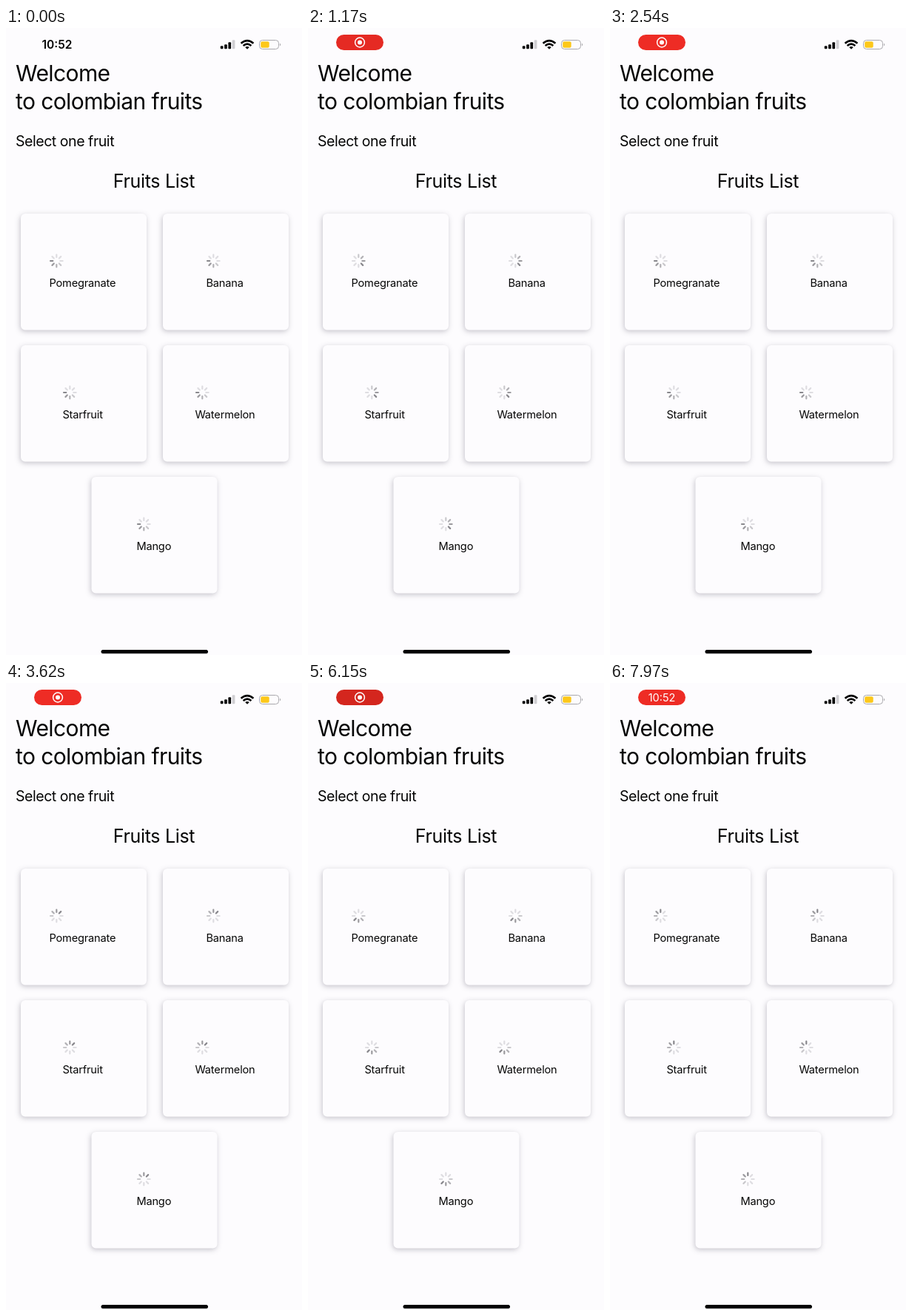
These frames come from a looping animation (400 px wide and 848 px high, 8000 ms). An HTML page:

```html
<!DOCTYPE html>
<html lang="en">
<head>
<meta charset="utf-8">
<title>Fruits</title>
<style>
  html, body { margin: 0; width: 100%; height: 100%; overflow: hidden; background: #fdfcfe; }
  svg { position: absolute; inset: 0; width: 100%; height: 100%; }
  text { font-family: Inter, "Open Sans", sans-serif; fill: #050505; }
  .title { font-size: 30px; letter-spacing: -.02em; }
  .hint { font-size: 19.5px; letter-spacing: -.023em; }
  .heading { font-size: 25px; letter-spacing: -.013em; text-anchor: middle; }
  .label { font-size: 14.6px; letter-spacing: -.012em; }
  .clock { font-size: 15.5px; font-weight: 600; text-anchor: middle; }
  .pill-clock { font-size: 14.5px; text-anchor: middle; fill: #fff; }
  .card { fill: #fdfcfe; filter: drop-shadow(-.5px 2.5px 3.8px rgba(30, 26, 50, .25)); }
  .spoke { stroke-width: 2.2; stroke-linecap: round; }
</style>
</head>
<body>
<svg id="stage" viewBox="0 0 400 848">
  <text id="clock" class="clock" x="69" y="28">10:52</text>

  <g id="pill">
    <rect id="pillShape" x="-32" y="-10.5" width="64" height="21" rx="10.5"/>
    <g id="record">
      <circle r="6.4" fill="none" stroke="#fff" stroke-width="1.5"/>
      <circle r="3" fill="#fff"/>
    </g>
    <text id="pillClock" class="pill-clock" y="5.3">10:52</text>
  </g>

  <g id="signal"></g>
  <g fill="none" stroke="#050505" stroke-width="2.6">
    <path d="M317.6 20.8Q326 13.6 334.4 20.8"/>
    <path d="M320.6 24Q326 19.4 331.4 24"/>
    <path d="M326 28.8L323.2 26Q326 23.8 328.8 26Z" fill="#050505" stroke="none"/>
  </g>
  <rect x="342.5" y="16.5" width="26" height="12" rx="4" fill="none" stroke="#a9a8ac"/>
  <rect x="344.2" y="18.2" width="11.5" height="8.6" rx="2" fill="#fdc81a"/>
  <path d="M370 20.5Q372.4 22.5 370 24.6Z" fill="#a9a8ac"/>

  <text class="title" x="13" y="72">Welcome</text>
  <text class="title" x="13" y="110">to colombian fruits</text>
  <text class="hint" x="13" y="160">Select one fruit</text>
  <text class="heading" x="200" y="215.5">Fruits List</text>
  <g id="cards"></g>
  <rect x="128.5" y="841" width="144.5" height="5" rx="2.5"/>
</svg>
<script>
const LOOP = 8000;
const $ = id => document.getElementById(id);

function add(parent, tag, attrs, text) {
  const node = document.createElementNS("http://www.w3.org/2000/svg", tag);
  for (const name in attrs) node.setAttribute(name, attrs[name]);
  if (text) node.textContent = text;
  parent.append(node);
  return node;
}

// Linear value at time t in a list of [time, value] steps.
function tween(steps, t) {
  const next = steps.findIndex(([time]) => time > t);
  if (next === 0) return steps[0][1];
  if (next < 0) return steps[steps.length - 1][1];
  const [t0, a] = steps[next - 1], [t1, b] = steps[next];
  return a + (b - a) * (t - t0) / (t1 - t0);
}

const mix = (from, to, k) =>
  `rgb(${from.map((c, i) => Math.round(c + (to[i] - c) * k)).join()})`;

[4, 6, 9, 12].forEach((height, i) => add($("signal"), "rect", {
  x: 289.8 + i * 5.3, y: 28.3 - height, width: 3.7, height, rx: 1,
  fill: i < 3 ? "#050505" : "#cfced2"
}));

// Card corner, label start and name.
const fruits = [
  [20, 251, 59, "Pomegranate"], [212, 251, 271, "Banana"],
  [20, 429, 77, "Starfruit"], [212, 429, 256, "Watermelon"],
  [115.5, 607, 177, "Mango"]
];
const spinners = fruits.map(([x, y, left, name]) => {
  add($("cards"), "rect", { class: "card", x, y, width: 170, height: 157.5, rx: 6 });
  add($("cards"), "text", { class: "label", x: left - .6, y: y + 99 }, name);
  const spinner = add($("cards"), "g", { transform: `translate(${left + 9.3} ${y + 64})` });
  return Array.from({ length: 8 }, (_, i) => add(spinner, "path", {
    class: "spoke", d: "M0 -5V-8.3", transform: `rotate(${i * 45})`
  }));
});

const spin = [[0, 6], [590, 16], [1690, 23], [2540, 30], [4780, 54], [6150, 69], [7970, 88], [8000, 88.3]];
const clockFade = [[60, 1], [400, 0]];
const pillFade = [[330, 0], [590, .58], [770, 1]];
const pillScale = [[330, .6], [590, .79], [870, 1]];
const pillGlow = [[950, 1], [1600, 0], [1720, 0], [2500, 1], [5020, 1], [5800, 0], [6650, 0], [7400, 1]];
const swap = [[7520, 0], [7900, 1]];
const tail = [1, .8, .55, .3];
const dark = [136, 135, 140], pale = [229, 228, 232];

function draw(t) {
  const head = Math.floor(tween(spin, t) + .01);
  for (const spokes of spinners) spokes.forEach((spoke, i) => {
    const lag = (head - i + 16) % 8;
    spoke.setAttribute("stroke", mix(pale, dark, tail[lag] ?? .08));
  });

  $("clock").setAttribute("opacity", tween(clockFade, t));
  $("pill").setAttribute("opacity", tween(pillFade, t));
  $("pill").setAttribute("transform", `translate(70 19.5) scale(${tween(pillScale, t)})`);
  $("pillShape").setAttribute("fill", mix([212, 38, 30], [238, 44, 37], tween(pillGlow, t)));

  const swapped = tween(swap, t);
  $("record").setAttribute("opacity", 1 - swapped);
  $("pillClock").setAttribute("opacity", swapped);
}

const start = performance.now();
function frame() {
  draw((performance.now() - start) % LOOP);
  requestAnimationFrame(frame);
}
frame();
</script>
</body>
</html>
```
